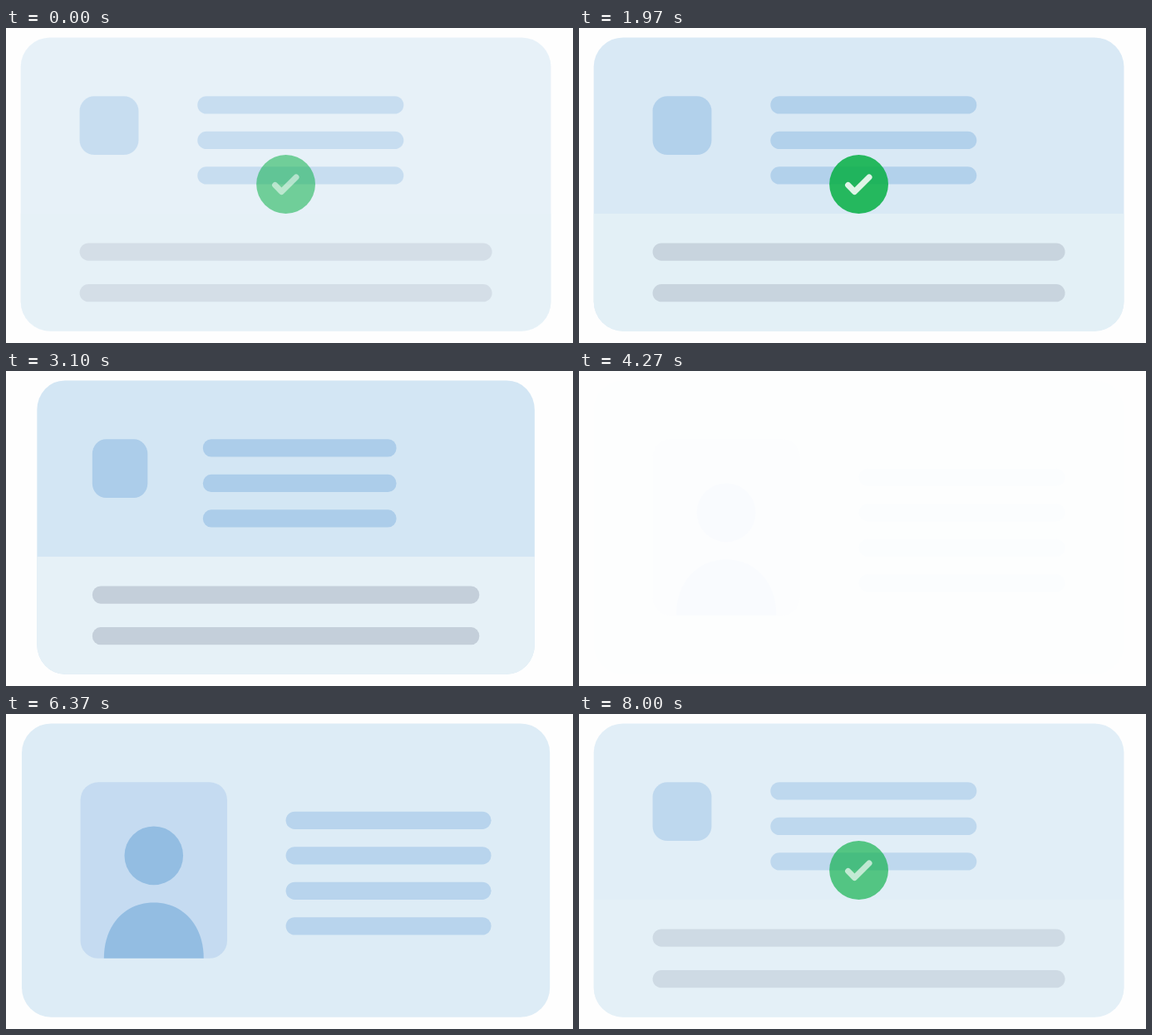
An HTML page that plays this animation: 682x380 px, repeating every 8.03 s.

```html
<!DOCTYPE html>
<html lang="en">
<head>
<meta charset="utf-8">
<title>Card flip</title>
<style>
  html, body { margin: 0; width: 100%; height: 100%; overflow: hidden; background: #fefefe; }
  svg { display: block; width: 682px; height: 380px; }
  /* every shape fades on its own, so overlaps show through */
  .face :is(rect, path, circle) { opacity: var(--fade, 1); }
  .card { fill: #d3e6f4; }
  .base { fill: #e6f1f7; }
  .bar { fill: #accdea; }
  .grey { fill: #c4cfda; }
  .photo { fill: #bdd6ef; }
  .person { fill: #83b4df; }
  .disc { fill: #08b046; }
  .tick { fill: none; stroke: #fff; stroke-width: .4; stroke-linecap: round; stroke-linejoin: round; }
</style>
</head>
<body>
<svg viewBox="0 0 682 380">
  <g transform="translate(0 11.4) scale(17.715)">
    <g id="card">
      <g id="front" class="face">
        <rect class="card" x="1" width="36" height="20" rx="2"/>
        <rect class="photo" x="5" y="4" width="10" height="12" rx="1.2"/>
        <circle class="person" cx="10" cy="9" r="2"/>
        <path class="person" d="M6.6 16C6.6 13.75 8 12.2 10 12.2S13.4 13.75 13.4 16Z"/>
      </g>
      <g id="back" class="face">
        <rect class="card" x="1" width="36" height="20" rx="2"/>
        <path class="base" d="M1 12H37V18A2 2 0 0 1 35 20H3A2 2 0 0 1 1 18Z"/>
        <rect class="bar" x="5" y="4" width="4" height="4" rx="1"/>
      </g>
    </g>
  </g>
</svg>
<script>
const LOOP = 8030, HOLD = 67, CYCLE = (LOOP - HOLD) / 4;
const $ = id => document.getElementById(id);
const card = $('card'), front = $('front'), back = $('back');

function add(parent, tag, attrs) {
  const el = document.createElementNS('http://www.w3.org/2000/svg', tag);
  for (const name in attrs) el.setAttribute(name, attrs[name]);
  return parent.appendChild(el);
}

function bars(face, kind, x, y, width, count, gap) {
  for (let i = 0; i < count; i++) {
    add(face, 'rect', { class: kind, x, y: y + i * gap, width, height: 1.2, rx: 0.6 });
  }
}

bars(front, 'bar', 19, 6, 14, 4, 2.4);
bars(back, 'bar', 13, 4, 14, 3, 2.4);
bars(back, 'grey', 5, 14, 28, 2, 2.8);

const check = add(back, 'g', {});
add(check, 'circle', { class: 'disc', r: 2 });
add(check, 'path', { class: 'tick', d: 'M-.73 .06L-.29 .5L.7 -.48' });

// cubic-bezier(.42, 0, .58, 1)
function ease(x) {
  let lo = 0, hi = 1;
  for (let i = 0; i < 20; i++) {
    const s = (lo + hi) / 2, r = 1 - s;
    if (1.26 * s * r * r + 1.74 * s * s * r + s * s * s < x) lo = s;
    else hi = s;
  }
  return lo * lo * (3 - 2 * lo);
}

const span = (t, from, to) => ease(Math.min(1, Math.max(0, (t - from) / (to - from))));

function popScale(t) {
  return t < 1510 ? 1.18 * span(t, 1300, 1510) : 1.18 - 0.18 * span(t, 1510, 1620);
}

function draw(time) {
  // each cycle starts at the flip; the back fades out at its end
  const phase = Math.max(0, time % LOOP - HOLD) % CYCLE;
  const t = phase < 200 ? phase + CYCLE : phase;
  const angle = Math.PI * span(t, 200, 1300);
  const showBack = angle > Math.PI / 2;
  const width = Math.max(0.001, Math.abs(Math.cos(angle)));
  const pop = popScale(t);

  card.setAttribute('transform', `translate(19 0) scale(${width} 1) translate(-19 0)`);
  front.style.display = showBack ? 'none' : '';
  back.style.display = showBack ? '' : 'none';
  front.style.setProperty('--fade', span(t, 200, 400));
  back.style.setProperty('--fade', 1 - span(t, 1800, 2195));
  check.style.display = pop > 0.001 ? '' : 'none';
  check.setAttribute('transform', `translate(19 10) scale(${pop})`);
}

const start = performance.now();
function tick() {
  draw(performance.now() - start);
  requestAnimationFrame(tick);
}
tick();
</script>
</body>
</html>
```
